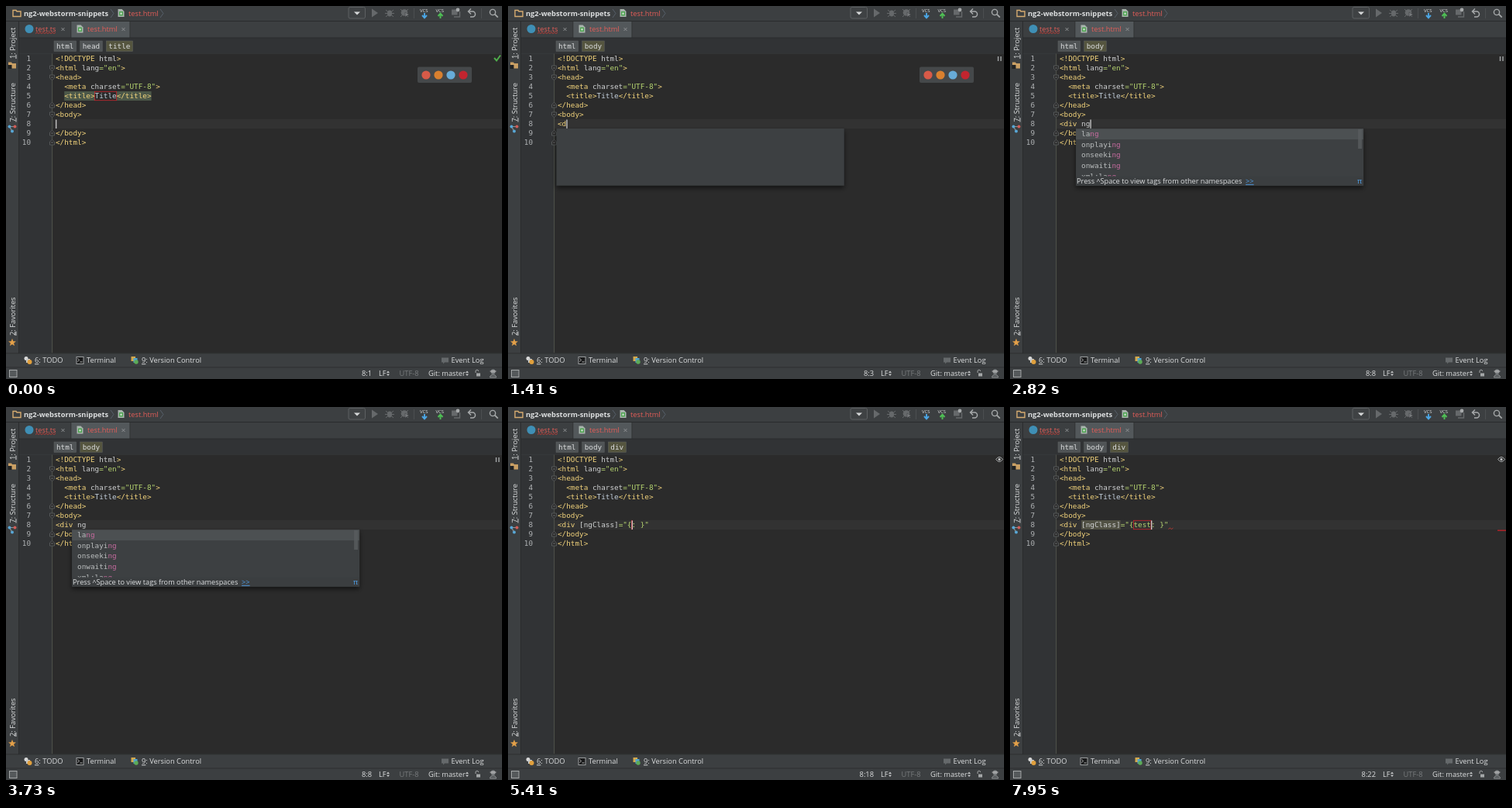
Write an HTML page that moves like this. It is 640 px wide and 481 px high and loops after 8 s.

```html
<!DOCTYPE html>
<html lang="en">
<head>
<meta charset="UTF-8">
<title>Editor snippets</title>
<style>
  html, body { margin: 0; width: 100%; height: 100%; overflow: hidden; background: #3c3f41; }
  svg { display: block; width: 640px; height: 481px; }
  text { font: 9.3px "Open Sans", "Noto Sans", sans-serif; fill: #dcdedf; white-space: pre; }
  .mono { font: 9.33px "DejaVu Sans Mono", monospace; }
  .bold { font-weight: bold; }
  .tag { fill: #f3d47c; }
  .attr { fill: #d0d2d3; }
  .str { fill: #b6d570; }
  .plain { fill: #c4d0dc; }
  .num { fill: #b0b3b5; }
  .red { fill: #e25d58; }
  .dim { fill: #787b7d; }
  .item { fill: #bbbebf; }
  .hit { fill: #c66a9e; }
  .link { fill: #4f9fe8; text-decoration: underline; }
  .u { text-decoration: underline; }
</style>
</head>
<body>
<svg id="stage" viewBox="0 0 640 481" xmlns="http://www.w3.org/2000/svg">
  <defs>
    <filter id="shadow" x="-10%" y="-20%" width="120%" height="150%">
      <feDropShadow dx="0" dy="3" stdDeviation="3" flood-color="#000" flood-opacity=".6"/>
    </filter>
    <clipPath id="list"><rect x="0" y="0" width="371" height="62"/></clipPath>
  </defs>
  <g id="frame"></g>
  <g id="editor"></g>
</svg>
<script>
const LOOP = 8000, CHAR = 5.617, LEFT = 64, LINE = 12;
const colX = col => LEFT + col * CHAR;
const baseY = line => 59.4 + line * LINE;
const esc = s => s.replace(/&/g, '&amp;').replace(/</g, '&lt;');

const rect = (x, y, w, h, fill, more = '') =>
  `<rect x="${x}" y="${y}" width="${w}" height="${h}" fill="${fill}" ${more}/>`;
const disc = (x, y, r, fill) => `<circle cx="${x}" cy="${y}" r="${r}" fill="${fill}"/>`;
const path = (d, stroke, width = 1, fill = 'none') =>
  `<path d="${d}" stroke="${stroke}" stroke-width="${width}" fill="${fill}"/>`;
const span = (cls, s) => `<tspan class="${cls}">${esc(s)}</tspan>`;
const rich = (x, y, inner, cls = '', more = '') =>
  `<text x="${x}" y="${y}" class="${cls}" ${more}>${inner}</text>`;
const text = (x, y, s, cls, more) => rich(x, y, esc(s), cls, more);
const code = (line, parts, indent = 0) =>
  rich(colX(indent), baseY(line), parts.map(p => span(...p)).join(''), 'mono');
const wave = (x, y, w) => {
  let d = `M${x} ${y}`;
  for (let i = 1; i * 2 <= w; i++) d += `l2 ${i % 2 ? -1.5 : 1.5}`;
  return path(d, '#d23b35', .8);
};

const folder = (x, y) =>
  path(`M${x} ${y}v-8h4l1 1.5h5v6.5z`, '#d5ab70', 1.4);
const page = (x, y) =>
  path(`M${x} ${y}h5l3 3v7h-8z`, 'none', 0, '#a9b5ae') +
  rect(x + 1.5, y + 3, 5, 5.5, '#4fa352') + rect(x + 3, y + 4.5, 2, 2.5, '#d8e6d8');
const cross = (x, y) => path(`M${x - 2} ${y - 2}l4 4m0 -4l-4 4`, '#8d9092');
const side = (y, key, label) =>
  rich(0, 0, span('u', key) + ': ' + label, '', `transform="translate(11.5 ${y}) rotate(-90)"`);
const tool = (x, key, label) => rich(x, 460.3, span('u', key) + ': ' + label);
const updown = x =>
  path(`M${x} 473l2 -2.5 2 2.5zM${x} 474.5l2 2.5 2 -2.5z`, 'none', 0, '#c4c6c7');

function topBar() {
  const gray = '#66696b', pale = '#a6a9aa';
  const vcs = (x, color, dir) => text(x, 7.5, 'VCS', '', 'style="font-size:6px"') +
    path(`M${x + 6} ${dir > 0 ? 9 : 16}v${dir * 6}m-3 ${-dir * 3}l3 ${dir * 3.3} 3 ${-dir * 3.3}`, color, 1.9);
  return rect(0, 0, 640, 19, '#3c3f41') + rect(0, 19, 640, 1, '#292b2c') +
    folder(9, 13.5) + text(23, 13, 'ng2-webstorm-snippets', 'bold') +
    path('M135 4l4 5.5 -4 5.5M199 4l4 5.5 -4 5.5', '#57606a') +
    page(144.5, 4) + text(158, 13, 'test.html', 'red') +
    rect(442, 1.5, 21.5, 14.5, '#3f4244', 'rx="2" stroke="#5d6062"') +
    path('M449 7.5h8l-4 4z', 'none', 0, '#d5d7d8') +
    path('M472 3.5v11l8 -5.5z', 'none', 0, gray) +
    `<ellipse cx="495" cy="9.5" rx="3" ry="4" fill="${gray}"/>` +
    path('M490 5l10 9m0 -9l-10 9m-1 -4.5h12', gray) +
    disc(514, 8.5, 4.3, gray) + path('M509 4l10 10m-10 0l10 -10', gray) +
    path('M515 8v6l5 -3z', '#3c3f41', .5, '#777a7c') +
    vcs(534, '#4ca6e4', 1) + vcs(554.5, '#4fbf55', -1) +
    rect(575, 4.5, 7.5, 7, gray) + path('M578 14h7.5v-7', gray, 1.4) + disc(583, 5, 2.4, pale) +
    path('M600 3.5l-3.5 3.5 3.5 3.5M597 7h5a3.4 3.4 0 0 1 0 7h-3', pale, 1.5) +
    path('M613.5 3v13M526.5 3v13', '#4b4e50') +
    `<circle cx="628" cy="8" r="3.6" fill="none" stroke="${pale}" stroke-width="1.4"/>` +
    path('M630.7 10.7l4 4', pale, 1.7);
}

function tabs() {
  return rect(17, 20, 623, 21, '#3c3f41') + rect(84, 20, 76, 21, '#53585b') +
    rect(83.5, 20, .8, 21, '#2d2f30') + rect(159.5, 20, .8, 21, '#2d2f30') +
    disc(30, 29.5, 5.5, '#3f8fb5') +
    text(38, 33, 'test.ts', 'red') + wave(38, 35.5, 26) + cross(73.5, 30) +
    page(91.5, 24.5) + text(105, 33, 'test.html', 'red') + cross(151.5, 30) +
    rect(17, 40.5, 623, 1, '#2b2d2e');
}

function sideBar() {
  const star = Array.from({ length: 10 }, (_, i) => {
    const r = i % 2 ? 2.2 : 5.2, a = Math.PI * (i / 5 - .5);
    return `${8 + r * Math.cos(a)} ${434 + r * Math.sin(a)}`;
  }).join('L');
  return rect(0, 20, 16, 428, '#3c3f41') + rect(16, 20, 1, 428, '#2a2c2d') +
    side(68, '1', 'Project') +
    path('M3 80.5v-8h4l1 1.5h5v6.5z', 'none', 0, '#c99f64') + rect(2.5, 76, 5, 5, '#202223') +
    side(149.5, '7', 'Structure') +
    path('M4.5 155.5l6.5 0M4.5 155.5l3.5 6', '#8f9496', 1.2) +
    disc(4.5, 155.5, 2, '#58a7d6') + disc(11.5, 155.5, 2, '#cf5c57') + disc(8, 161.5, 2, '#58a7d6') +
    side(425, '2', 'Favorites') + path(`M${star}z`, 'none', 0, '#e3a049');
}

function bottomBars() {
  return rect(0, 448, 640, 33, '#3c3f41') + rect(0, 447.5, 640, .8, '#2a2c2d') + rect(0, 465.5, 640, 1, '#2d2f30') +
    disc(26, 454.5, 2.5, '#d9dada') + rect(26, 455, 5, 5, '#c9cbcb') + disc(30.5, 459, 3, '#e0a03d') +
    tool(37, '6', 'TODO') +
    rect(91, 452.5, 9, 9, '#191a1b', 'stroke="#9b9e9f"') + path('M92.5 454.5l2 2 -2 2m3 .5h3', '#ddd', .8) +
    text(104, 460.3, 'Terminal') +
    rect(161.5, 452, 5.5, 6, '#d3a94d') + rect(164.5, 454, 5, 6, '#51a5d0') + disc(168, 459, 2.7, '#5cab57') +
    tool(175, '9', 'Version Control') +
    path('M562 453.5h9v6h-5l-2 2v-2h-2z', 'none', 0, '#65696b') + text(574.5, 460.3, 'Event Log') +
    rect(4.5, 469.5, 9.5, 9, '#55595b', 'stroke="#a4a7a8"') +
    text(481, 477, 'LF') + updown(491) + text(507.5, 477, 'UTF-8', 'dim') +
    text(545, 477, 'Git: master') + updown(593) +
    path('M606 473v-2a1.8 1.8 0 0 1 3.6 0', '#a4a7a8') + rect(607, 473.5, 5, 4, '#a4a7a8') +
    disc(628.5, 471.5, 3, '#8c8f91') + path('M624.5 471h8', '#bbb') +
    path('M624.5 479c0 -5 8 -5 8 0z', '#8c8f91', 1, '#55595b');
}

const SOURCE = [
  [1, 0, [['tag', '<!DOCTYPE '], ['attr', 'html'], ['tag', '>']]],
  [2, 0, [['tag', '<html '], ['attr', 'lang'], ['str', '="en"'], ['tag', '>']]],
  [3, 0, [['tag', '<head>']]],
  [4, 2, [['tag', '<meta '], ['attr', 'charset'], ['str', '="UTF-8"'], ['tag', '>']]],
  [5, 2, [['tag', '<title>'], ['plain', 'Title'], ['tag', '</title>']]],
  [6, 0, [['tag', '</head>']]],
  [7, 0, [['tag', '<body>']]],
  [9, 0, [['tag', '</body>']]],
  [10, 0, [['tag', '</html>']]]
];

function fold(line) {
  const y = 56 + line * LINE, bend = line > 5 && line !== 7 ? -1 : 1;
  return path(`M56.5 ${y - 3 * bend}h6v${4 * bend}l-3 ${2.5 * bend}l-3 ${-2.5 * bend}z`, '#5f6264', .8, '#2b2b2b') +
    path(`M58 ${y}h3`, '#777a7c', .8);
}

function editorBase() {
  let out = rect(17, 41, 623, 20.5, '#313335') + rect(17, 61, 623, .8, '#3d4042') +
    rect(17, 61.5, 43, 386, '#313335') + rect(60, 61.5, 580, 386, '#2b2b2b') +
    rect(60, 146, 580, 12, '#323232') + rect(59.2, 61.5, .9, 386, '#55564f');
  for (let n = 1; n <= 10; n++) out += text(32, baseY(n), String(n), 'mono num', 'text-anchor="end"');
  return out + [2, 3, 6, 7, 9, 10].map(fold).join('');
}

const browsers = rect(531, 78.5, 70, 20.5, '#45484a', 'rx="2"') +
  ['#d85a48', '#d9802f', '#67acd9', '#c2252f'].map((c, i) => disc(542 + 16 * i, 89, 5.6, c)).join('');

function crumbs(names) {
  let x = 62;
  return names.map((name, i) => {
    const w = name.length * CHAR + 6.2, last = i === names.length - 1;
    const box = rect(x, 45, w, 13.5, last ? '#55553f' : '#505456', 'stroke="#5d6061" stroke-width=".5"') +
      text(x + 3, 55, name, 'mono');
    x += w + 5;
    return box;
  }).join('');
}

const gutterMark = {
  check: path('M630 67l3 3.5 5 -7', '#4fae4c', 2),
  pause: path('M632.5 65v6m3.5 -6v6', '#a4a7a8', 1.4),
  eye: path('M629.5 67.5q4.5 -6 9 0q-4.5 6 -9 0z', '#a9acad', 1) + disc(634, 67.5, 1.6, '#c4c6c7')
};

const MENUS = {
  empty: { col: 1 },
  ng: {
    col: 5, hint: 'Press ^Space to view tags from other namespaces', hit: 'ng',
    items: [['lang'], ['onplaying'], ['onseeking'], ['onwaiting'], ['xml:lang']]
  },
  ng2: {
    col: 5, hint: '^↓ and ^↑ will move caret down and up in the editor', hit: 'ng2',
    items: ['routerLink', 'ngClass', '*ngFor', '*ngIf', 'ngModel']
      .map(s => ['ng2-' + s.replace('*', ''), `Angular 2 ${s} snippet`])
  }
};

function popup(name, selected) {
  const { col, items, hint, hit } = MENUS[name];
  let out = rect(0, 0, 371, 73.5, '#3d4043', 'filter="url(#shadow)"');
  if (items) {
    const rows = items.map(([label, note], i) => {
      const y = 10.2 + 13.6 * i, at = label.lastIndexOf(hit);
      return rich(7, y, span('item', label.slice(0, at)) + span('hit', hit) +
        span('item', label.slice(at + hit.length)), 'mono') +
        (note ? text(366, y, note, 'mono num', 'text-anchor="end"') : '');
    }).join('');
    out += `<g clip-path="url(#list)">${rect(0, .5 + 13.6 * selected, 371, 13.5, '#4c5052')}${rows}</g>` +
      rect(364, 1, 5, name === 'ng' ? 25 : 36, '#595d5f', 'fill-opacity=".8"') +
      rect(0, 61.5, 371, 12, '#3b3e40') +
      rich(1, 70.8, esc(hint) + '  ' + span('link', '>>'), '', 'style="font-size:9.2px"') +
      text(363, 70.8, 'π', '', 'style="fill:#4f9fe8"');
  }
  return `<g transform="translate(${colX(col) - 7} 158)">${out}</g>`;
}

// time, text on line 8, menu, selected row; snippet steps hold the typed key
const STEPS = [
  [0, ''], [1150, '<'], [1340, '<d', 'empty'], [1680, '<di', 'empty'], [1830, '<div', 'empty'],
  [2050, '<div '], [2620, '<div n'], [2760, '<div ng', 'ng'],
  [4300, '<div ng2', 'ng2', 0], [4860, '<div ng2', 'ng2', 1],
  [5100, '', 0, 0, true], [6720, 't', 0, 0, true], [6960, 'te', 0, 0, true],
  [7240, 'tes', 0, 0, true], [7580, 'test', 0, 0, true]
];
const HEAD = '<div [ngClass]="{';

function viewAt(t) {
  const [start, typed, menu, row, snippet] = STEPS.findLast(s => s[0] <= t);
  return {
    typed, menu, row, snippet,
    caret: (t - start) % 1000 < 500,
    title: t < 400,
    browsers: t < 1700,
    crumb: t < 400 ? ['html', 'head', 'title'] : t < 5400 ? ['html', 'body'] : ['html', 'body', 'div'],
    mark: t < 1150 ? 'check' : t < 5100 ? 'pause' : 'eye',
    error: t >= 5850,
    warn: t >= 6350
  };
}

function drawEditor(v) {
  const line = v.snippet ? `${HEAD}${v.typed}: }"` : v.typed;
  const col = v.snippet ? HEAD.length + v.typed.length : line.length;
  const [, tag, attr, value] = line.match(/^(<?\w*)([^=]*)(.*)$/);
  const outline = (c, n, l) =>
    rect(colX(c), l * LINE + 50.3, n * CHAR, 11.4, 'none', 'stroke="#c9252d" stroke-width=".8"');
  let out = crumbs(v.crumb);
  if (v.title) {
    out += rect(colX(2), 110, 7 * CHAR, 12, '#4c5849') + rect(colX(14), 110, 8 * CHAR, 12, '#4c5849') +
      outline(9, 5, 5);
  }
  if (v.warn) out += rect(colX(5), 146, 9 * CHAR, 12, '#515144');
  out += SOURCE.map(([n, indent, parts]) => code(n, parts, indent)).join('') +
    code(8, [['tag', tag], ['attr', attr], ['str', value]]);
  if (v.snippet) out += outline(HEAD.length, v.typed.length || .15, 8);
  if (v.error) out += wave(colX(line.length), 157.5, 6) + rect(629, 158.5, 11, 1.3, '#c5232a');
  if (v.caret) out += rect(colX(col) + .2, 146.5, 1.1, 11.5, '#e8e8e8');
  out += gutterMark[v.mark];
  if (v.browsers) out += browsers;
  if (v.menu) out += popup(v.menu, v.row || 0);
  return out + text(472, 477, `8:${col + 1}`, '', 'text-anchor="end"');
}

document.getElementById('frame').innerHTML =
  editorBase() + topBar() + tabs() + sideBar() + bottomBars();
const editor = document.getElementById('editor');
let shown = '';

function tick() {
  const view = viewAt(performance.now() % LOOP), key = JSON.stringify(view);
  if (key !== shown) {
    shown = key;
    editor.innerHTML = drawEditor(view);
  }
  requestAnimationFrame(tick);
}
tick();
</script>
</body>
</html>
```
